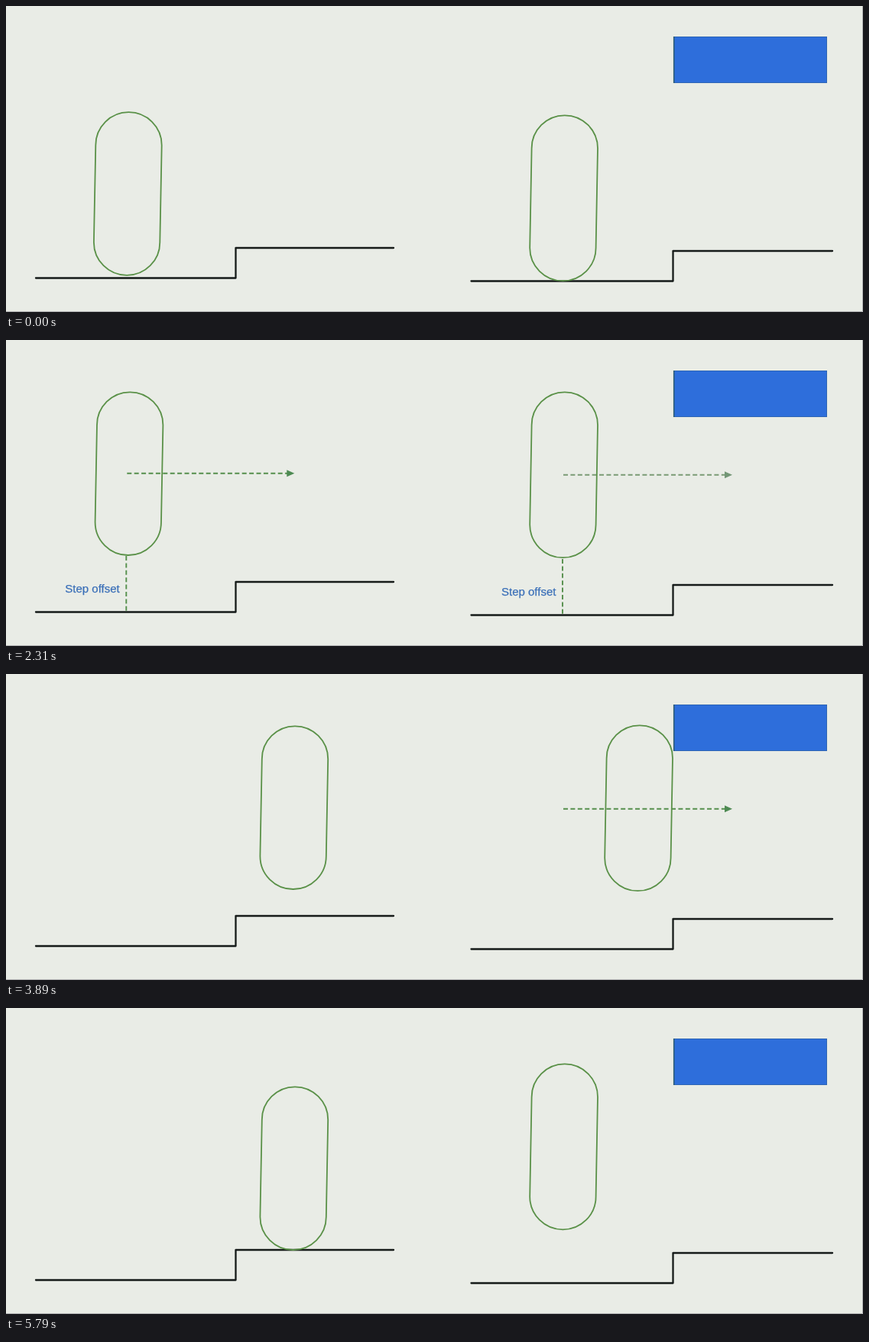
Recreate the animation shown at these times as an HTML page. Size 1121x401 px, loop 5830 ms.

```html
<!DOCTYPE html>
<html lang="en">
<head>
<meta charset="utf-8">
<title>Step offset</title>
<style>
  html, body { margin: 0; width: 100%; height: 100%; overflow: hidden; background: #e9ece6; }
  svg { display: block; }
  path { fill: none; }
  .ground { stroke: #151a18; stroke-width: 2.3; stroke-linejoin: round; stroke-linecap: round; }
  .capsule { stroke: #5a9148; stroke-width: 1.8; }
  .dash { stroke: #558f4c; stroke-width: 1.9; stroke-dasharray: 6 3.4; }
  .head { fill: #4d8a52; }
  text { font: 15px "Liberation Sans", Arial, sans-serif; fill: #3a6fb8; stroke: #3a6fb8; stroke-width: .25; }
</style>
</head>
<body>
<svg width="1121" height="401" viewBox="0 0 1121 401">
  <rect width="1121" height="401" fill="#e9ece6"/>
  <path d="M0 400.5H1120.5V0" stroke="#adaeb0"/>
  <rect x="873.5" y="40.5" width="200" height="60" fill="#2e6edb" stroke="#2f66b4"/>
  <path d="M873.7 40V101" stroke="#2d5c75" stroke-width="1.6"/>
  <g id="left"></g>
  <g id="right"></g>
</svg>
<script>
const LOOP = 5830;
const RESET = 4880; // the blocked capsule starts over here

// Raised pose: top arc centre (x, 111.5), bottom arc centre (x - 2.4, low).
const capsule = (x, low) => {
  const r = 43.2, b = x - 2.4;
  return `M${x - r} 111.5A${r} ${r} 0 0 1 ${x + r} 111.5L${b + r} ${low}A${r} ${r} 0 0 1 ${b - r} ${low}Z`;
};

function build(id, s) {
  const g = document.getElementById(id);
  g.innerHTML = `
    <g class="label">
      <path class="dash" d="M${s.x} ${s.floor - 73.5}V${s.floor}"/>
      <text x="${s.x - 80}" y="${s.floor - 25.3}">Step offset</text>
    </g>
    <g class="arrow">
      <path class="dash" d="M${s.x + 1} ${s.mid}h${s.len - 9}"/>
      <path class="head" d="M${s.x + s.len - 9} ${s.mid - 4.5}l10 4.5l-10 4.5z"/>
    </g>
    <path class="ground" d="M${s.x0} ${s.floor}H${s.edge}V${s.step}H${s.x1}"/>
    <path class="capsule" d="${capsule(s.cx, s.low)}"/>`;
  const [label, arrow, body] = ["label", "arrow", "capsule"].map(c => g.querySelector("." + c));
  return { label, arrow, body };
}

const left = build("left", { x: 157.3, floor: 356.5, mid: 174.8, len: 219,
  x0: 39, edge: 300.5, step: 317, x1: 507, cx: 160.5, low: 238.8 });
const right = build("right", { x: 728, floor: 360.5, mid: 176.8, len: 221,
  x0: 608.5, edge: 872.5, step: 321, x1: 1081, cx: 730.8, low: 242 });

const ramp = (t, a, b) => Math.min(1, Math.max(0, (t - a) / (b - a)));
const ease = (t, a, b) => .5 - .5 * Math.cos(Math.PI * ramp(t, a, b));

// Fades in grey first, then takes on its colour.
function fade(el, t, in0, in1, out0, out1) {
  const p = ramp(t, in0, in1) * (1 - ramp(t, out0, out1));
  el.style.opacity = p;
  el.style.filter = p > 0 && p < 1 ? `saturate(${p * p})` : "none";
}

const place = (el, x, y) => el.setAttribute("transform", `translate(${x} ${y})`);

function draw(t) {
  place(left.body, 217.5 * ease(t, 2251, 3320),
    74 * (1 - ease(t, -152, 1012)) + 35 * ease(t, 3930, 4850));
  fade(left.label, t, 1130, 1680, 3330, 3620);
  fade(left.arrow, t, 1450, 1950, 3480, 3800);

  if (t < RESET) {
    const across = ease(t, 2446, 3500);
    place(right.body, 98 * across,
      75 * (1 - ease(t, 385, 1335)) - across + 76 * ease(t, 4050, 4800));
  } else {
    place(right.body, 0, 75 * (1 - ease(t, 5003, 5951)));
  }
  fade(right.label, t, 1480, 2000, 3500, 3830);
  fade(right.arrow, t, 1900, 2400, 3950, 4240);
}

const start = performance.now();
function frame() {
  draw((performance.now() - start) % LOOP);
  requestAnimationFrame(frame);
}
frame();
</script>
</body>
</html>
```
